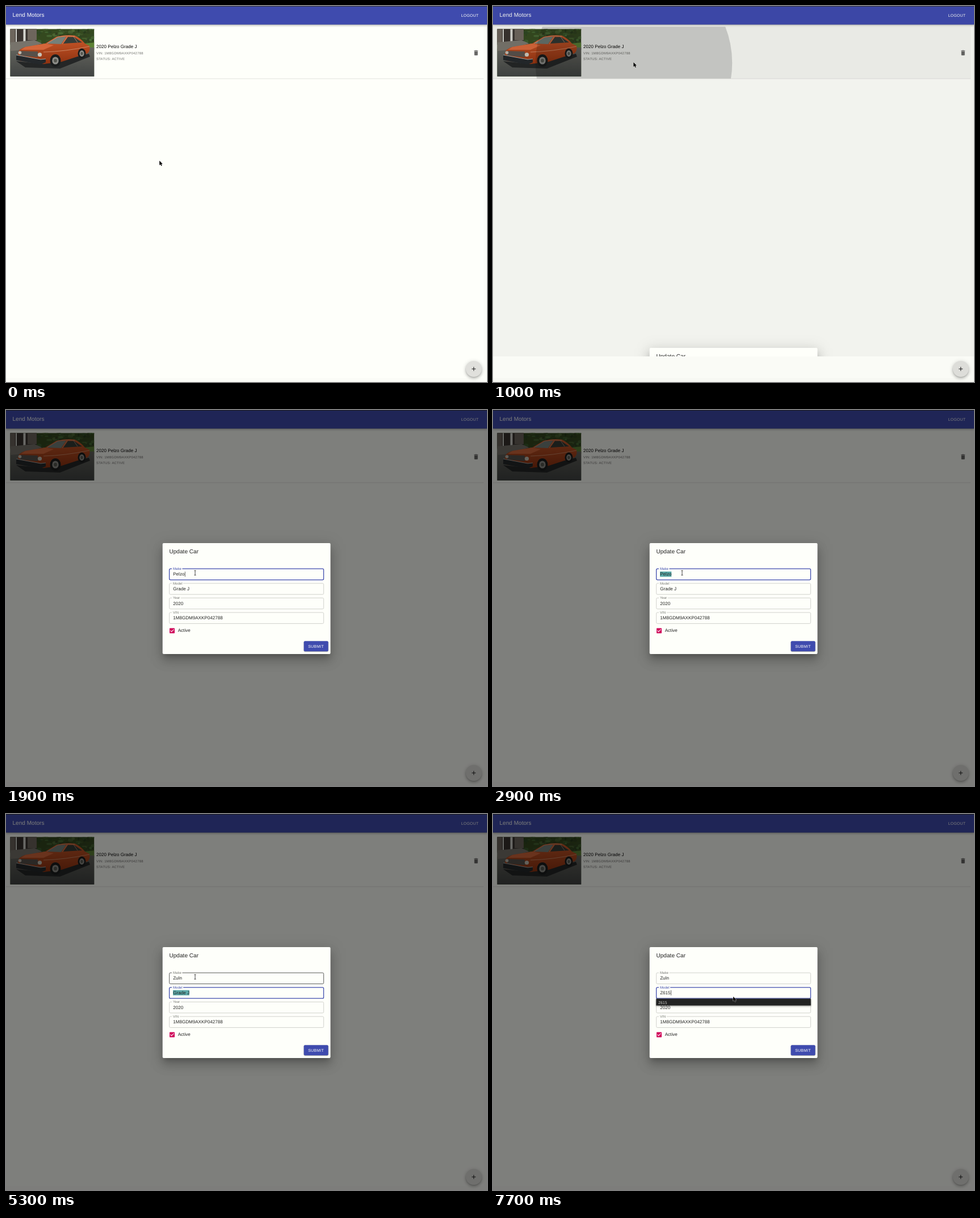
An HTML page for the animation above (8 s loop, 847x661 px).

```html
<!DOCTYPE html>
<html lang="en">
<head>
<meta charset="utf-8">
<title>Car list</title>
<style>
  html, body { margin: 0; width: 100%; height: 100%; overflow: hidden; background: #fefffa; }
  svg { display: block; }
  text { font-family: "Liberation Sans", Arial, sans-serif; text-rendering: geometricPrecision; white-space: pre; }
  .h6 { font-size: 10px; letter-spacing: .04px; }
  .body { font-size: 8px; letter-spacing: .05px; }
  .small { font-size: 6px; letter-spacing: .2px; fill: #757573; }
  .label { font-size: 6px; letter-spacing: .05px; }
  .button { font-size: 7px; letter-spacing: .2px; fill: #fefffa; }
  .mono { font: 6.5px "DejaVu Sans Mono", monospace; fill: #d0d0cc; }
</style>
</head>
<body>
<svg id="stage" width="847" height="661" viewBox="0 0 847 661">
  <defs>
    <clipPath id="photoClip"><rect x="7.5" y="40.5" width="147.7" height="83.3"/></clipPath>
    <clipPath id="rowClip"><rect y="36.5" width="841" height="91"/></clipPath>
    <clipPath id="paintClip"><rect id="paintArea" width="847" height="661"/></clipPath>
    <linearGradient id="road" x2="0" y2="1"><stop stop-color="#66665f"/><stop offset="1" stop-color="#404342"/></linearGradient>
    <linearGradient id="paint" x2="0" y2="1"><stop stop-color="#cc5a2b"/><stop offset="1" stop-color="#8f3210"/></linearGradient>
  </defs>

  <rect width="847" height="661" fill="#fefffa"/>
  <rect x="841" y="33" width="6" height="628" fill="#fbfcf7"/>
  <rect y="654" width="847" height="7" fill="#fbfcf7"/>
  <rect id="hover" y="36.5" width="841" height="91" fill-opacity=".04"/>
  <path d="M0 127.8H841" stroke="#dededa" stroke-width=".8"/>

  <g clip-path="url(#photoClip)">
    <rect x="7" y="40" width="149" height="85" fill="#34491f"/>
    <g id="leaves"></g>
    <path d="M7 40H54V62L7 68Z" fill="#39332f"/>
    <path d="M7 40H16V64H7ZM38 40H54V60H38Z" fill="#6d655c"/>
    <path d="M30.5 40h4v24h-4zM17 40h2v24h-2z" fill="#d4d4ce"/>
    <path d="M128 67 156 64V77H140Z" fill="#5c8236"/>
    <path d="M7 75 40 70 156 73V125H7Z" fill="url(#road)"/>
    <path d="M7 64 50 60 64 66 20 78 7 79Z" fill="#77736b"/>
    <path d="M18 97 66 102 146 84 148 89 95 110 34 108Z" fill="#242626"/>
    <path d="M21 84Q22 75 34 72L69 66 89 54Q105 50 121 52Q132 57 139 66L147 70Q149 78 144 83L98 98 66 102 23 96Z" fill="url(#paint)"/>
    <path d="M34 72 69 66 84 69 66 77 26 77Z" fill="#d4663a"/>
    <path d="M72 66 91 55 106 54 97 67Z" fill="#74807a"/>
    <path d="M101 66 109 54.5 120 54.5 134 64Z" fill="#343c37"/>
    <path d="M72 66 91 54.5Q106 51 121 53.5M99 67 108 54M126 64 119 54M66 81Q104 80 147 71" fill="none" stroke="#d9a383" stroke-width=".7"/>
    <path d="M25 79 56 80V90L25 87Z" fill="#57504a"/>
    <path d="M18 86 61 94 70 93V99L61 103 18 95Z" fill="#24282b"/>
    <path d="M18 86 61 94 70 93" fill="none" stroke="#a9aba7"/>
    <circle cx="24.5" cy="82" r="2.8" fill="#bdb9ae"/>
    <circle cx="59.5" cy="85.5" r="3.6" fill="#c6c3b8"/>
    <g id="wheels"></g>
  </g>

  <text class="body" x="159" y="74.2">2020 Pelzo Grade J</text>
  <text class="small" x="159" y="85.4">VIN: 1M8GDM9AXKP042788</text>
  <text class="small" x="159" y="95.3">STATUS: ACTIVE</text>
  <path transform="translate(821.7 76.3) scale(.5)" fill="#666664" d="M6 19c0 1.1.9 2 2 2h8c1.1 0 2-.9 2-2V7H6zM19 4h-3.5l-1-1h-5l-1 1H5v2h14z"/>
  <g clip-path="url(#rowClip)"><circle id="ripple" cx="248" cy="100"/></g>

  <g id="barShadow"></g>
  <rect width="847" height="32.6" fill="#3f4bae"/>
  <rect width="847" height="1" fill="#35363c"/>
  <text class="h6" x="11.5" y="19.3" fill="#fefffa">Lend Motors</text>
  <text class="button" x="801.4" y="18.7">LOGOUT</text>
  <g id="fabShadow"></g>
  <circle cx="823.7" cy="638" r="14" fill="#e0e0dc"/>
  <path d="M820.2 638h7M823.7 634.5v7" stroke="#1c1c1c"/>

  <rect id="dimTop" width="847" height="616"/>
  <rect id="dimBottom" y="616" width="847" height="45"/>

  <g clip-path="url(#paintClip)">
    <g id="dialog">
      <g id="dialogShadow"></g>
      <rect x="275.7" y="234" width="295.7" height="195" rx="2" fill="#fefffa"/>
      <text class="h6" x="287.5" y="252.2" fill="#222">Update Car</text>
      <g id="fields"></g>
      <path transform="translate(286.5 382) scale(.5)" fill="#d0055b" d="M19 3H5c-1.11 0-2 .9-2 2v14c0 1.1.89 2 2 2h14c1.11 0 2-.9 2-2V5c0-1.1-.89-2-2-2zm-9 14l-5-5 1.41-1.41L10 14.17l7.59-7.59L19 8z"/>
      <text class="body" x="302.7" y="390.4" fill="#222">Active</text>
      <g id="buttonShadow"></g>
      <rect x="524.5" y="406.3" width="43" height="18" rx="2" fill="#3f4bae"/>
      <text class="button" x="532" y="417.6">SUBMIT</text>
      <g id="menu">
        <rect id="menuBox" x="287.3" width="272.4" fill="#222322" style="filter: drop-shadow(0 1px 1.5px #0007)"/>
        <text class="mono" x="291" y="9"></text>
        <text class="mono" x="291" y="18.5"></text>
      </g>
    </g>
  </g>

  <path id="arrow" d="M0 0V8L1.9 6.3 3.2 9.2 4.5 8.6 3.2 5.8H5.6Z" stroke="#f4f4f0" stroke-width=".7" paint-order="stroke"/>
  <g id="beam" fill="none">
    <path d="M-1.6-4H1.6M0-4V4M-1.6 4H1.6" stroke="#e8e8e4" stroke-width="1.6"/>
    <path d="M-1.6-4H1.6M0-4V4M-1.6 4H1.6" stroke="#333" stroke-width=".8"/>
  </g>
</svg>

<script>
const LOOP = 8000, STEP = 100;
const BLUE = '#3f4bae', GREY = '#c6c6c2', DARK = '#333';
const OLD_MAKE = 'Pelzo', OLD_MODEL = 'Grade J', NEW_MAKE = 'Zuln', NEW_MODEL = 'Z615';
const $ = id => document.getElementById(id);

function set(node, attrs) {
  for (const key in attrs) node.setAttribute(key, attrs[key]);
}
function add(parent, tag, attrs, text) {
  const node = document.createElementNS('http://www.w3.org/2000/svg', tag);
  set(node, attrs);
  if (text) node.textContent = text;
  return parent.appendChild(node);
}
const show = (node, on) => set(node, { display: on ? 'inline' : 'none' });
const clamp = x => Math.min(1, Math.max(0, x));
function ease(t, from, to) {
  const p = clamp((t - from) / (to - from));
  return p * p * (3 - 2 * p);
}

// Three blurred layers whose size grows with the height above the page.
function shadow(parent, x, y, width, height, radius, lift) {
  const layer = (dy, blur, spread, opacity) => add(parent, 'rect', {
    x: x - spread, y: y + dy - spread, width: width + 2 * spread, height: height + 2 * spread,
    rx: radius, 'fill-opacity': opacity, style: `filter: blur(${blur / 2}px)`
  });
  layer(lift / 2, lift * .7, -lift / 4, .2);
  layer(lift, lift * 1.5, lift / 8, .14);
  layer(lift / 3, lift * 2, lift / 4, .12);
}
shadow($('barShadow'), 0, 0, 847, 32.6, 0, 2);
shadow($('fabShadow'), 809.7, 624, 28, 28, 14, 3);
shadow($('dialogShadow'), 275.7, 234, 295.7, 195, 2, 12);
shadow($('buttonShadow'), 524.5, 406.3, 43, 18, 2, 1);

let seed = 7;
const random = () => (seed = seed * 16807 % 2147483647) / 2147483647;
for (let i = 0; i < 90; i++) {
  add($('leaves'), 'ellipse', {
    cx: 50 + random() * 108, cy: 39 + random() * 30, rx: 1 + random() * 4, ry: 1 + random() * 2,
    fill: `hsl(${85 + random() * 20} 32% ${14 + random() * 24}%)`, 'fill-opacity': .7
  });
}
function wheel(cx, cy, rx, ry) {
  const ring = (scale, fill) => add($('wheels'), 'ellipse', { cx, cy, rx: rx * scale, ry: ry * scale, fill });
  ring(1, '#1a1c1c');
  ring(.6, '#8d8d88');
  ring(.3, '#55564f');
}
wheel(87, 96, 9.5, 11);
wheel(133.5, 83.5, 7, 9);

function makeField(name, index) {
  const y = 279.2 + index * 25.6;
  const group = add($('fields'), 'g', { transform: `translate(0 ${y})` });
  const box = add(group, 'rect', { x: 287.6, width: 271.8, height: 19.4, rx: 2, fill: 'none' });
  const notch = add(group, 'rect', { x: 292, y: -1.5, height: 3, fill: '#fefffa' });
  const label = add(group, 'text', { class: 'label', x: 294, y: 1.9 }, name);
  const mark = add(group, 'rect', { x: 294, y: 4.8, height: 9.2, fill: '#5ba9a8' });
  const text = add(group, 'text', { class: 'body', x: 294.2, y: 12.2, fill: '#222' });
  const caret = add(group, 'rect', { y: 5, width: .7, height: 9, fill: '#222' });
  set(notch, { width: label.getComputedTextLength() + 3.5 });
  return { y, box, label, mark, text, caret };
}
const [make, model, year, vin] = ['Make', 'Model', 'Year', 'VIN'].map(makeField);

function drawField(field, value, { focused, hovered, selected, caret } = {}) {
  set(field.box, { stroke: focused ? BLUE : hovered ? DARK : GREY, 'stroke-width': focused ? 1.3 : .8 });
  set(field.label, { fill: focused ? BLUE : '#777774' });
  field.text.textContent = value;
  const width = field.text.getComputedTextLength();
  set(field.mark, { width });
  set(field.caret, { x: 294.6 + width });
  show(field.mark, selected);
  show(field.caret, caret);
}

function drawMenu(field, items) {
  show($('menu'), items.length);
  set($('menu'), { transform: `translate(0 ${field.y + 19.8})` });
  set($('menuBox'), { height: 2.5 + 9.5 * items.length });
  $('menu').querySelectorAll('text').forEach((line, i) => line.textContent = items[i] || '');
}

// The old value stays until the first key is pressed.
function typed(t, oldValue, newValue, keyTimes) {
  return newValue.slice(0, keyTimes.filter(key => key <= t).length) || oldValue;
}

// Each glide: start, end, x, y.
const glides = [
  [200, 400, 254, 225], [500, 800, 247.4, 99], [1000, 1100, 248, 104],
  [1100, 1400, 327, 312], [1600, 1900, 333, 286.3], [5600, 6000, 423, 322.3]
];
function pointerAt(t) {
  return glides.reduce(([x, y], [from, to, nextX, nextY]) => {
    const p = ease(t, from, to);
    return [x + (nextX - x) * p, y + (nextY - y) * p];
  }, [270.2, 272]);
}

function draw(t) {
  const within = (from, to) => t >= from && t < to;

  show($('hover'), within(700, 1100));
  set($('ripple'), {
    r: (Math.max(0, t - 860) * .094) ** 2,
    'fill-opacity': .16 * (1 - clamp((t - 1000) / 300))
  });

  // While the dialog slides in, the bottom of the screen repaints late.
  const opened = ease(t, 967, 1107);
  const late = t < 1100;
  const dim = .5 * opened ** 1.2;
  set($('dimTop'), { 'fill-opacity': dim });
  set($('dimBottom'), { 'fill-opacity': late ? dim / 3 : dim });
  set($('paintArea'), { height: late ? 616 : 661 });
  show($('dialog'), opened);
  set($('dialog'), { transform: `translate(0 ${427 * (1 - opened)})` });

  const makeValue = typed(t, OLD_MAKE, NEW_MAKE, [4600, 4900, 5000, 5000]);
  const modelValue = typed(t, OLD_MODEL, NEW_MODEL, [7000, 7500, 7700, 7700]);
  drawField(make, makeValue, {
    focused: within(1800, 5300), hovered: within(1700, 5700),
    selected: within(2500, 4600), caret: within(1900, 2500) || within(4600, 5300)
  });
  drawField(model, modelValue, {
    focused: t >= 5300, hovered: within(1500, 1700), selected: within(5300, 7000), caret: t >= 7000
  });
  drawField(year, '2020');
  drawField(vin, '1M8GDM9AXKP042788');

  const menuOpen = within(2400, 2900) || within(4700, 5300) || t >= 7100;
  const [field, value] = t < 5300 ? [make, makeValue] : [model, modelValue];
  const known = field === make ? [OLD_MAKE, NEW_MAKE, 'Zirpa'] : [NEW_MODEL];
  drawMenu(field, menuOpen ? known.filter(name => name.startsWith(value)) : []);

  const [x, y] = pointerAt(t);
  const beam = within(1400, 7100);
  show($('beam'), beam);
  show($('arrow'), !beam);
  set($('beam'), { transform: `translate(${x} ${y})` });
  set($('arrow'), { transform: `translate(${x} ${y - (t >= 7100 ? 1.3 : 0)})` });
}

const start = performance.now();
function tick() {
  const elapsed = (performance.now() - start) % LOOP;
  draw(Math.floor(elapsed / STEP) * STEP);
  requestAnimationFrame(tick);
}
tick();
</script>
</body>
</html>
```
